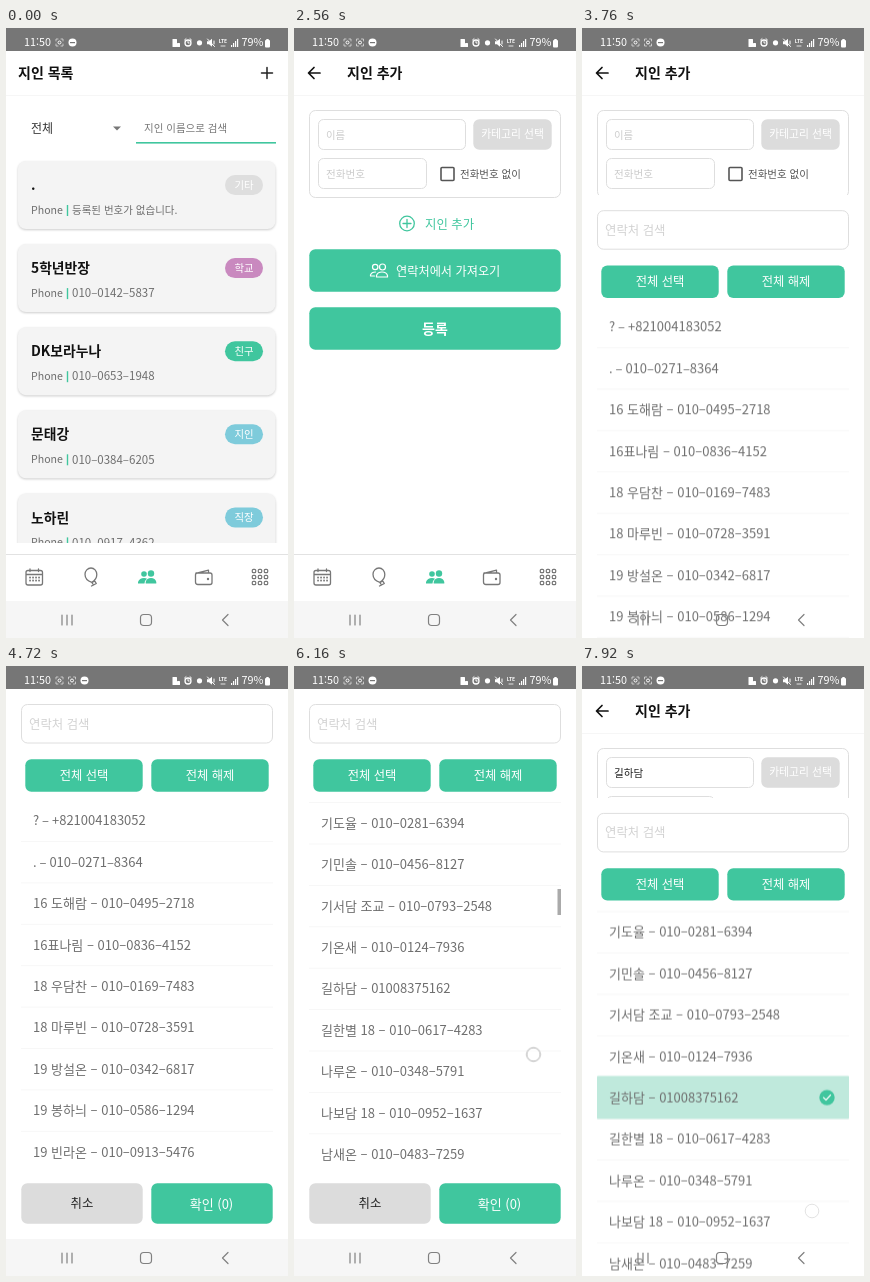
Animation of 282 by 610 pixels, one loop 8000 ms. Source, as an HTML page:

```html
<!DOCTYPE html>
<html lang="ko">
<head>
<meta charset="utf-8">
<title>지인 관리</title>
<style>
html, body { margin: 0; width: 100%; height: 100%; overflow: hidden; background: #fff; }
svg { display: block; width: 282px; height: 610px; }
text { font-family: "Noto Sans CJK KR", "Noto Sans CJK", "Noto Sans", sans-serif; white-space: pre; }
.b { font-weight: 700; }
.m { font-weight: 500; }
.mid { text-anchor: middle; }
.line { fill: none; stroke: #777; stroke-width: 1.3; stroke-linecap: round; stroke-linejoin: round; }
.card { filter: drop-shadow(0 1.5px 1.2px #0003); }

/* one loop is 8 s, so 1% is 80 ms */
.a { animation: 8s linear infinite; }
.list, .form { transform-origin: 141px 281px; }
.list { animation-name: leave; }
.form { animation-name: enter; }
.modal { animation-name: slide; }
.rows { animation-name: scroll; }
.thumb { animation-name: thumb; }
.late { animation-name: late; }
.early { animation-name: early; }
.icon { animation-name: icon; }
.dnd { animation-name: dnd; }
.touch { animation-name: touch; }

@keyframes leave {
  0%, 19% { opacity: 1; transform: none; }
  20% { opacity: .7; transform: scale(1.038); animation-timing-function: ease-out; }
  24%, 100% { opacity: 0; transform: scale(1.1); }
}
@keyframes enter {
  0%, 20% { opacity: 0; transform: scale(.907); animation-timing-function: ease-out; }
  24%, 100% { opacity: 1; transform: none; }
}
@keyframes slide {
  0%, 45% { transform: translateY(587px); animation-timing-function: cubic-bezier(.33,.67,.67,1); }
  49% { transform: none; }
  97.39% { transform: none; animation-timing-function: cubic-bezier(.333,0,.667,.333); }
  100% { transform: translateY(282px); }
}
@keyframes scroll {
  0%, 61% { transform: none; }
  64% { transform: translateY(-230px); }
  67% { transform: translateY(-476px); }
  70% { transform: translateY(-760px); animation-timing-function: ease-out; }
  76%, 100% { transform: translateY(-1032.5px); }
}
@keyframes thumb {
  0%, 61% { opacity: 0; transform: none; height: 36px; }
  62% { opacity: 1; }
  64% { transform: translateY(21px); height: 34px; }
  67% { transform: translateY(42px); height: 32px; }
  70% { transform: translateY(68px); height: 29px; animation-timing-function: ease-out; }
  76% { transform: translateY(90px); height: 26px; }
  79% { opacity: 1; }
  82%, 100% { opacity: 0; transform: translateY(90px); height: 26px; }
}
@keyframes late { 0%, 86.99% { opacity: 0; } 87%, 100% { opacity: 1; } }
@keyframes early { 0%, 86.99% { opacity: 1; } 87%, 100% { opacity: 0; } }
@keyframes icon { 0%, 3.99% { opacity: 0; } 5%, 100% { opacity: 1; } }
@keyframes dnd { 0%, 4% { transform: none; } 5%, 100% { transform: translateX(12px); } }
@keyframes touch {
  0%, 61% { opacity: 0; transform: translate(266px, 420px); }
  61.01% { opacity: 1; transform: translate(266px, 420px); }
  64% { opacity: 1; transform: translate(268px, 230px); }
  64.01%, 65.99% { opacity: 0; transform: translate(271px, 420px); }
  66% { opacity: 1; transform: translate(271px, 420px); }
  67% { opacity: 1; transform: translate(271px, 334px); }
  69% { opacity: 1; transform: translate(273px, 180px); }
  69.01%, 75.99% { opacity: 0; transform: translate(239.5px, 388.5px); }
  76%, 77.5% { opacity: 1; transform: translate(239.5px, 388.5px); }
  78.5% { opacity: 0; transform: translate(239.5px, 388.5px); }
  78.51%, 95.99% { opacity: 0; transform: translate(230px, 545px); }
  96%, 98% { opacity: 1; transform: translate(230px, 545px); }
  99% { opacity: .35; transform: translate(230px, 545px); }
  100% { opacity: 0; transform: translate(230px, 545px); }
}
</style>
</head>
<body>
<svg viewBox="0 0 282 610"></svg>
<script>
const GREEN = '#40c69e', INK = '#6e6e6e', ROW = 41.4, PICKED = 29;

const dash = s => s.replace(/-/g, '–');
// y is the vertical middle of the text
const text = (x, y, s, size, fill, cls = '') =>
  `<text x="${x}" y="${y + size * .37}" font-size="${size}" fill="${fill}" class="${cls}">${s}</text>`;
const rect = (x, y, w, h, r, fill, more = '') =>
  `<rect x="${x}" y="${y}" width="${w}" height="${h}" rx="${r}" fill="${fill}" ${more}/>`;
const box = (x, y, w, h, r, stroke = '#dedede', width = 1) =>
  rect(x + .5, y + .5, w - 1, h - 1, r, '#fff', `stroke="${stroke}" stroke-width="${width}"`);
const line = (d, stroke = '#777', width = 1.3) =>
  `<path class="line" d="${d}" style="stroke:${stroke};stroke-width:${width}"/>`;
const dot = (x, y, r, fill, more = '') => `<circle cx="${x}" cy="${y}" r="${r}" fill="${fill}" ${more}/>`;
const button = (x, y, w, h, label, size, fill = GREEN, ink = '#fff', cls = '') =>
  rect(x + .3, y + .3, w - .6, h - .6, 6, fill) + text(x + w / 2, y + h / 2, label, size, ink, 'mid ' + cls);

const cards = [
  ['.', '', '기타', '#dedede'],
  ['5학년반장', '010-0142-5837', '학교', '#c989bf'],
  ['DK보라누나', '010-0653-1948', '친구', GREEN],
  ['문태강', '010-0384-6205', '지인', '#7ecbdb'],
  ['노하린', '010-0917-4362', '직장', '#7ecbdb']
].map(([name, phone, tag, color], i) => {
  const y = 133 + 83.1 * i;
  return rect(12, y, 257.5, 68, 8, '#f4f4f4', 'class="card"') +
    text(25, y + 24, name, 13.8, '#111', 'b') +
    rect(219, y + 14, 38, 20, 10, color) + text(238, y + 24, tag, 10.4, '#fff', 'mid') +
    text(25, y + 49, 'Phone', 10.6, INK) + rect(60.800, y + 44, 1.400, 11, 0, GREEN) +
    (phone ? text(66, y + 49, dash(phone), 11.5, INK)
           : text(66, y + 49, '등록된 번호가 없습니다.', 10.5, INK));
}).join('');

const listPage = `<g class="a list">${rect(0, 23, 282, 503, 0, '#fff')}
  ${rect(0, 67, 282, 1, 0, '#f6f6f6')}
  ${text(12, 45, '지인 목록', 14, '#111', 'b')}
  ${line('M255.5 45h11M261 39.500v11', '#222', 1.5)}
  ${text(25, 101, '전체', 12, '#333')}
  <path d="M107 98.500h8l-4 4z" fill="#777"/>
  ${text(138, 100, '지인 이름으로 검색', 10.5, '#777')}
  ${rect(130, 114, 140, 1.6, 0, GREEN)}
  <g clip-path="url(#cards)">${cards}</g></g>`;

const formPage = `<g class="a form">${rect(0, 23, 282, 503, 0, '#fff')}
  ${rect(0, 67, 282, 1, 0, '#f6f6f6')}
  ${line('M26 45H15M20 39.500L14.500 45L20 50.500', '#111', 1.7)}
  ${text(53, 45, '지인 추가', 14, '#111', 'b')}
  ${box(15, 82, 252, 88, 6)}
  ${box(24, 91, 148, 31, 5)}
  ${text(32, 107, '이름', 10.4, '#ccc', 'a early')}
  ${text(32, 107, '길하담', 10.6, '#222', 'a late')}
  ${button(179, 91, 79, 31, '카테고리 선택', 10.8, '#dcdcdc')}
  ${box(24, 130, 109, 31, 5)}${text(32, 146, '전화번호', 10.6, '#ccc')}
  ${box(146.500, 139, 14, 14, 1, '#555', 1.6)}${text(166, 146, '전화번호 없이', 10.5, '#555')}
  ${line('M109 195.500h8M113 191.500v8M105.700 195.500a7.300 7.300 0 1 0 14.600 0a7.300 7.300 0 1 0 -14.600 0', GREEN)}
  ${text(131, 196, '지인 추가', 12.4, GREEN, 'm')}
  ${button(15, 221, 252, 43, '', 12)}
  ${line('M78.500 239a2.700 2.700 0 1 0 5.400 0a2.700 2.700 0 1 0 -5.400 0M85.500 239a3 3 0 1 0 6 0a3 3 0 1 0 -6 0M76.500 248v-1q1-3 5-3M82.500 249v-1.500q1-3.500 5.500-3.500t5.500 3.500v1.500zM76.500 248h4', '#fff', 1.2)}
  ${text(102, 243, '연락처에서 가져오기', 12.2, '#fff')}
  ${button(15, 279, 252, 43, '등록', 14, GREEN, '#fff', 'b')}</g>`;

const contacts = [
  '? - +821004183052', '. - 010-0271-8364', '16 도해람 - 010-0495-2718', '16표나림 - 010-0836-4152',
  '18 우담찬 - 010-0169-7483', '18 마루빈 - 010-0728-3591', '19 방설온 - 010-0342-6817',
  '19 봉하늬 - 010-0586-1294', '19 빈라온 - 010-0913-5476', '19 서여울 - 010-0247-3865',
  '19 석도담 - 010-0674-9132', '19 선가온 - 010-0359-2748', '19 양누리 - 010-0815-6423',
  '19 여한결 - 010-0436-7591', '19 은솔 - 010-0782-1356', '5학년반장 - 010-0142-5837',
  '7반 옥찬씨 - 01003618472', '곽나온 - 010-0527-8143', '구름찬 - 01006294815', '국별 - 010-0748-3162',
  '권다솜 - 010-0193-5724', '금보늬 - 010-0862-4379', '금새론 - 010-0315-9642',
  '금하론 - 010-0574-2186', '기가람 - 010-0639-7415', '기도율 - 010-0281-6394', '기민솔 - 010-0456-8127',
  '기서담 조교 - 010-0793-2548', '기온새 - 010-0124-7936', '길하담 - 01008375162',
  '길한별 18 - 010-0617-4283', '나루온 - 010-0348-5791', '나보담 18 - 010-0952-1637', '남새온 - 010-0483-7259',
  '남이랑 - 010-0726-1895', '노을빈 - 010-0269-4731'
].map((s, i) => {
  const y = 154.500 + ROW * i;
  const mark = i === PICKED
    ? `<g class="a late">${rect(15, y - 21.500, 252, 43, 1, '#bfe9dc')}${dot(245, y, 7.7, GREEN)}${line(`M241.500 ${y}l2.500 2.500l4.500-5`, '#fff', 1.3)}</g>` : '';
  return rect(15, y + 20.500, 252, 1, 0, '#f7f7f7') + mark + text(27, y, dash(s), 13, INK);
}).join('');

const modal = `<g class="a modal">${rect(0, 23, 282, 550, 0, '#fff')}
  ${box(15, 38, 252, 39.500, 6)}${text(23, 58, '연락처 검색', 12.4, '#d2d2d2')}
  ${button(19, 93, 118, 33, '전체 선택', 12.3)}
  ${button(145, 93, 118, 33, '전체 해제', 12.3)}
  <g clip-path="url(#rows)"><g class="a rows">${contacts}</g></g>
  ${rect(263.500, 133, 3.5, 36, 0, '#aaa', 'class="a thumb"')}
  ${button(15, 517, 122, 41, '취소', 12.4, '#dcdcdc', '#222', 'm')}
  ${button(145, 517, 122, 41, '', 13)}
  ${text(205.500, 538, '확인 (0)', 13, '#fff', 'mid a early')}
  ${text(205.500, 538, '확인 (1)', 13, '#fff', 'mid a late')}</g>`;

const grid = (x, y, gap, n, m, draw) =>
  Array.from({ length: n * m }, (_, i) => draw(x + i % n * gap, y + Math.floor(i / n) * gap)).join('');

const tabs = rect(0, 526, 282, 47, 0, '#fff') + rect(0, 526, 282, 1, 0, '#e2e2e2') +
  line('M22 542.500h12.500a2 2 0 0 1 2 2v10.500a2 2 0 0 1-2 2h-12.500a2 2 0 0 1-2-2v-10.500a2 2 0 0 1 2-2zM20 546.500h16.500M24 541v2.500M32.500 541v2.500') +
  grid(24, 549.500, 3, 4, 2, (x, y) => rect(x - .8, y - .8, 1.7, 1.7, 0, '#777')) +
  line('M85 540a5.800 6.500 0 0 1 5.800 6.500q0 5-5 7.800q-6.800-2-6.800-8a6 6.300 0 0 1 6-6.300zM85.800 554.300l3-1.200l1.500 2.400l-2.800 1.500zM87.500 557l-2 1') +
  dot(138, 546, 2.8, GREEN) + dot(145, 545.500, 3.2, GREEN) +
  `<path d="M132 555.500v-1.500q1.500-4 6-4q2 0 3 .7q-2.500 1.800-2.500 4.800zM139.700 555.500v-1.500q1-4 5.300-4t5.300 4v1.500z" fill="${GREEN}"/>` +
  line('M190 545h14a2 2 0 0 1 2 2v7.500a2 2 0 0 1-2 2h-12a2.500 2.500 0 0 1-2.500-2.500v-7a2 2 0 0 1 2-2l11-2.800v2.800') +
  dot(202, 551, 1.2, '#777') +
  grid(248, 543, 6, 3, 3, (x, y) => rect(x - 1.7, y - 1.7, 3.4, 3.4, 1, 'none', 'stroke="#777" stroke-width="1.2"')) +
  rect(0, 573, 282, 37, 0, '#f6f6f6');

const nav = line('M56 587v10M61 587v10M66 587v10', '#808080', 1.2) +
  rect(134.500, 586.500, 11, 11, 3.2, 'none', 'stroke="#808080" stroke-width="1.2"') +
  line('M222 586.500l-5.500 5.500l5.500 5.500', '#808080', 1.2);

const frameIcon = x => line(`M${x - 3.5} 13v-2h2M${x + 1.5} 11h2v2M${x + 3.5} 16v2h-2M${x - 1.5} 18h-2v-2`, '#ddd', .8) +
  dot(x, 14.500, 1.5, 'none', 'stroke="#fff"');
const status = rect(0, 0, 282, 23, 0, '#767676') + text(18, 14.500, '11:50', 10.8, '#fff') +
  frameIcon(53.500) + `<g class="a icon">${frameIcon(66)}</g>` +
  `<g class="a dnd">${dot(66.500, 14.500, 4, '#fff')}${rect(64, 14, 5, 1.2, 0, '#767676')}</g>` +
  rect(166.500, 11, 4.500, 8, .5, '#fff') + rect(171, 15, 3, 4, .5, '#fff') +
  dot(182, 15, 3, 'none', 'stroke="#fff" stroke-width="1.3"') + line('M178.500 12l1.500-1.300M185.500 12l-1.500-1.300M182 13.500v1.500h1.200', '#fff', 1) +
  dot(193.500, 14.800, 2.6, '#fff') +
  `<path d="M201 13.300h2l3-2.500v8l-3-2.500h-2z" fill="#fff"/>` + line('M201.500 11l7 7.500M208 13v3', '#fff', 1) +
  text(217, 13, 'LTE', 5, '#fff', 'mid b') + line('M215 18h4', '#fff', .8) +
  [0, 1, 2, 3].map(i => rect(225 + i * 2, 17 - i * 2, 1.2, 2 + i * 2, 0, '#fff')).join('') +
  text(235.500, 14.500, '79%', 10.8, '#fff') +
  rect(259, 12, 5, 7.500, 1, '#fff') + rect(260.300, 11, 2.400, 1.500, 0, '#fff');

const clip = (id, y, h) => `<clipPath id="${id}">${rect(0, y, 282, h, 0, '#000')}</clipPath>`;

document.querySelector('svg').innerHTML =
  `<defs>${clip('page', 23, 503)}${clip('cards', 120, 395)}${clip('rows', 133, 370)}</defs>` +
  `<g clip-path="url(#page)">${listPage}${formPage}</g>` + tabs + modal + nav + status +
  `<circle class="a touch" r="6.8" fill="#fff" fill-opacity=".6" stroke="#aaa"/>`;
</script>
</body>
</html>
```
